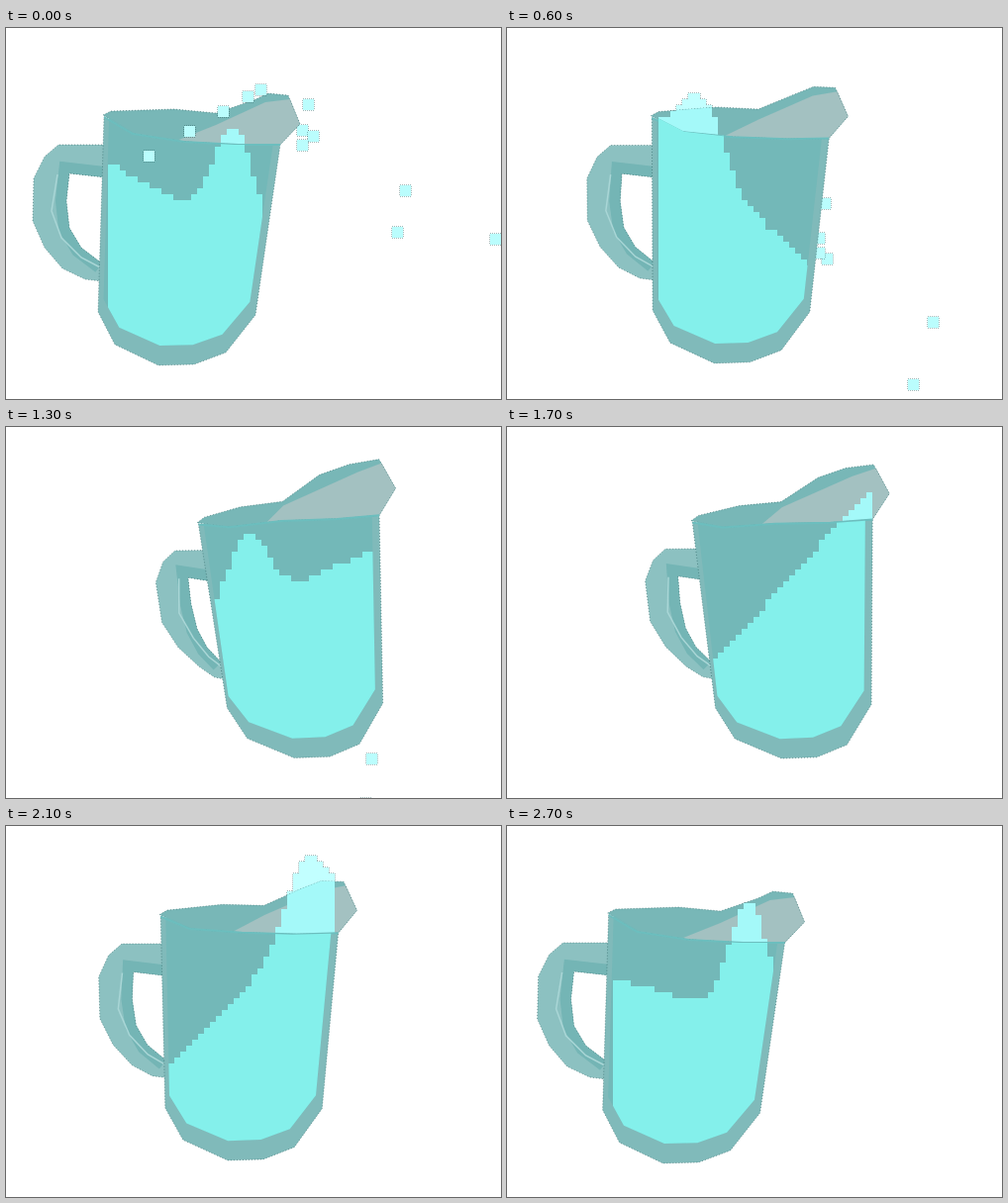
An HTML page with a canvas for the animation above (2.8 s loop, 500 by 375 pixels).

```html
<!DOCTYPE html>
<html lang="en">
<head>
<meta charset="utf-8">
<title>Water jug</title>
<style>
html, body { margin: 0; width: 100%; height: 100%; overflow: hidden; background: #fff; }
canvas { display: block; }
</style>
</head>
<body>
<canvas id="stage" width="500" height="375"></canvas>
<script>
const ctx = document.getElementById('stage').getContext('2d');
const LOOP = 2800, STEP = 100, CELL = 6, DROP = 11;
const EDGE = 'rgba(35,90,90,.55)';

// Points are measured from the left end of the rim, with the jug upright
const BASE = [[154, 202], [124, 240], [92, 252], [56, 253], [12, 232], [-5, 199]];
const HOLE = [[-1, 150], [-22, 134], [-34, 114], [-37, 87], [-34, 59], [2, 63]];
const HANDLE = [
  [2, 30], [-45, 30], [-59, 42], [-70, 64], [-71, 107], [-59, 134], [-41, 155], [-18, 166], [-1, 168], ...HOLE
];
const RIDGE = [[-46, 60], [-52, 97], [-42, 124], [-22, 144], [-1, 155]];

// Stray drops: start x, y, then speed in px/s
const STRAYS = [
  [403, 164, 45, 195], [395, 206, 25, 230], [494, 213, 45, 220],
  [305, 77, 0, 140], [299, 103, 0, 155], [310, 109, 0, 180], [299, 118, 0, 155]
];

const clamp = (v, lo, hi) => Math.min(hi, Math.max(lo, v));
const wave = (t, peak) => Math.cos(2 * Math.PI * (t - peak) / LOOP);

// One swing per loop: the jug slides right first and tilts late
function poseAt(t) {
  const swing = Math.sin(Math.PI * t / LOOP);
  return { x: 98 + 96 * swing ** 1.5, y: 88 + 9 * swing ** 5, k: swing ** 3.5 };
}

// Leans the lower part right and lifts the spout
function warp([px, py], { x, y, k }) {
  return [
    x + px + k * (.17 * py + .45 * clamp(-px, 0, 40)),
    y + py - k * (.23 * Math.max(px, 0) * (1 - py / 260) + .06 * py)
  ];
}

function shape(points, pose, closed = true) {
  const path = new Path2D();
  for (const p of points) path.lineTo(...warp(p, pose));
  if (closed) path.closePath();
  return path;
}

function lipPoints(k) {
  const flat = 1 - .4 * k;
  return [[1, 2], [30, 19 * flat], [82, 27 * flat], [137, 30 * (1 - .15 * k)], [179, 30]];
}

const inset = ([x, y]) => [74 + (x - 74) * .93, y - Math.max(0, y - 100) * .13];

// Tilting surface with a crest that runs from wall to wall
function depthAt(u, t) {
  const left = 82 - 78 * wave(t, 500);
  const right = 70 - 105 * wave(t, 1800);
  const run = wave(t, 2400);
  const height = 95 * Math.abs(run) + 45 * Math.max(0, wave(t, 0));
  const off = (u - .52 - .4 * run) / .17;
  return left + (right - left) * u - height * Math.exp(-off * off);
}

function waterCells(t, { x, y, k }) {
  const cells = new Path2D();
  const left = x + 5 + 12 * k, width = 166;
  for (let cx = Math.round(left); cx < left + width; cx += CELL) {
    const top = y + depthAt((cx + CELL / 2 - left) / width, t);
    const snapped = Math.round(top / CELL) * CELL;
    cells.rect(cx, snapped, CELL, 345 - snapped);
  }
  return cells;
}

function clipped(path, paint) {
  ctx.save();
  ctx.clip(path);
  paint();
  ctx.restore();
}

function fill(path, colour) {
  ctx.fillStyle = colour;
  ctx.fill(path);
}

function line(path, colour, width, dash = []) {
  ctx.strokeStyle = colour;
  ctx.lineWidth = width;
  ctx.setLineDash(dash);
  ctx.stroke(path);
}

function drop(x, y) {
  const box = new Path2D();
  box.rect(Math.round(x - DROP / 2), Math.round(y - DROP / 2), DROP, DROP);
  line(box, EDGE, 1.5, [1, 1]);
  fill(box, '#bafdfd');
}

// Stray drops fall freely and are pushed along by the moving wall
function strayDrops(t, pose) {
  const s = t / 1000;
  for (const [x, y, vx, vy] of STRAYS) {
    const wall = pose.x + Math.min(x - 129, 178);
    drop(Math.max(x + vx * s, wall), y + vy * s + 45 * s * s);
  }
}

// A short arc of drops falls back into the jug
function splashDrops(t) {
  if (t > 300) return;
  for (let i = 0; i < 5; i++) {
    const q = (i / 4) ** 1.6;
    drop(257 - 113 * q - .15 * t, 62 + 67 * q + .25 * t);
  }
}

function draw(t) {
  const pose = poseAt(t), { x, k } = pose;
  const lip = lipPoints(k);
  const bodyPoints = [...lip, ...BASE];
  const body = shape(bodyPoints, pose);
  const inside = shape(bodyPoints.map(inset), pose);
  const bend = 114 - 28 * k;
  const back = shape([
    [0, 0], [8, -4], [bend - 42, -6], [bend, -2], [152 - 26 * k, -15 - 4 * k],
    [167 - 10 * k, -22], [187, -20], [199, 9], ...lip.slice(1).reverse()
  ], pose);
  const spout = shape([
    [74 - 8 * k, 26 * (1 - .4 * k)], [bend, 10 - 8 * k], [164, -13], [189, -16], [199, 9], [179, 30], lip[3]
  ], pose);
  const handle = shape(HANDLE, pose);
  const cells = waterCells(t, pose);
  const above = shape(lip, pose, false);
  above.lineTo(x + 230, 0);
  above.lineTo(x, 0);
  above.closePath();

  ctx.fillStyle = '#fff';
  ctx.fillRect(0, 0, 500, 375);
  strayDrops(t, pose);
  clipped(above, () => {
    line(cells, EDGE, 1.5, [1, 1]);
    fill(cells, '#c2ffff');
  });

  fill(handle, '#8cc1c1');
  clipped(handle, () => {
    line(shape(HOLE, pose, false), '#74b5b5', 22);
    line(shape(RIDGE, pose, false), '#a9d6d6', 1.5);
  });
  line(handle, EDGE, 1, [1, 2]);

  fill(back, '#78b7b7');
  fill(spout, '#a3c1c1');
  line(back, EDGE, 1, [1, 2]);
  clipped(back, () => fill(cells, '#a4f9f9'));

  fill(body, '#80baba');
  fill(inside, '#73b8b8');
  line(body, EDGE, 1, [1, 2]);
  line(shape(lip, pose, false), '#6cbebe', 2);

  splashDrops(t);
  clipped(inside, () => fill(cells, '#84f0eb'));
}

const start = performance.now();
let shown = -1;
function tick() {
  const t = Math.floor((performance.now() - start) % LOOP / STEP) * STEP;
  if (t !== shown) draw(shown = t);
  requestAnimationFrame(tick);
}
tick();
</script>
</body>
</html>
```
